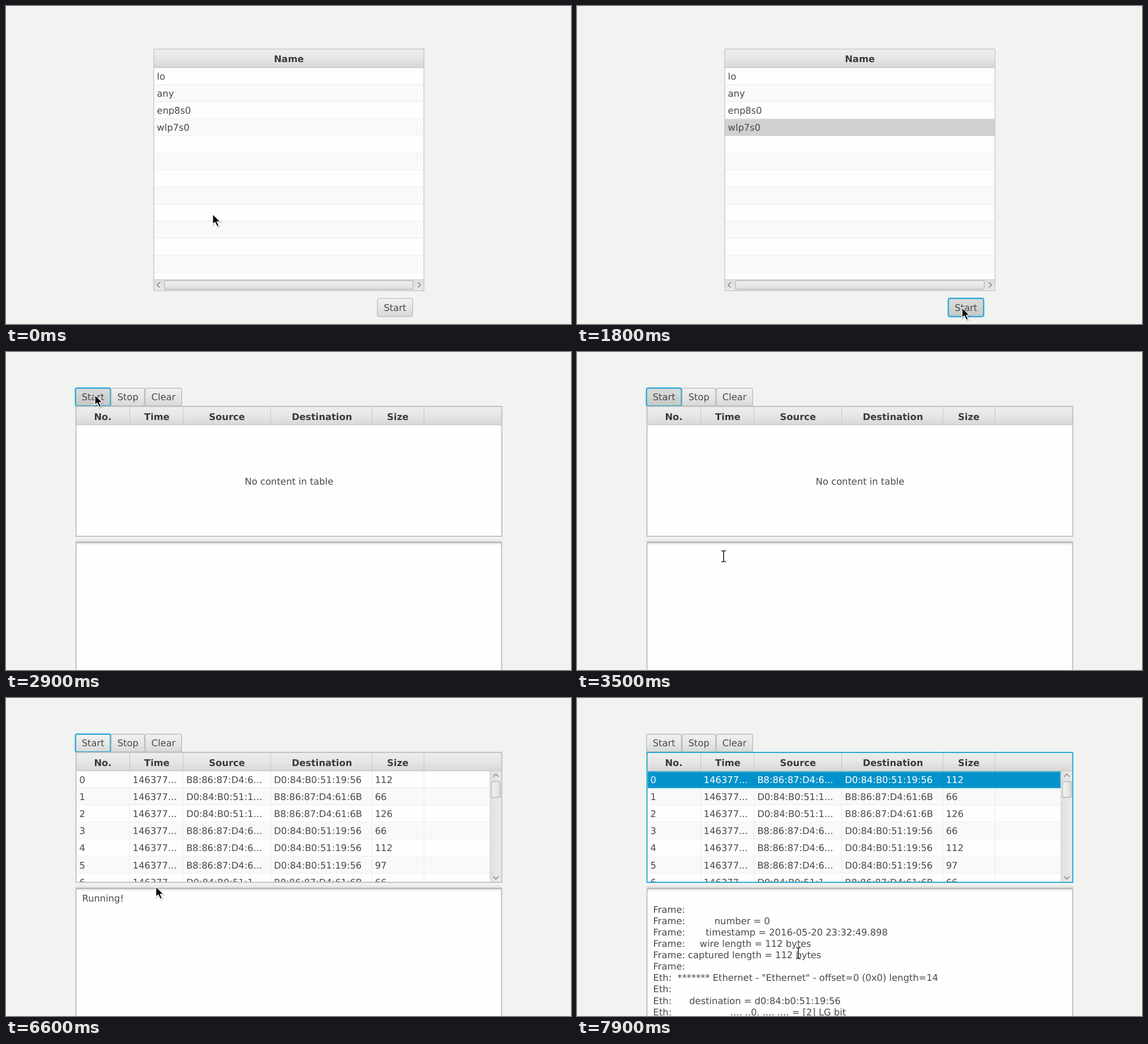
These frames come from a looping animation (998x561 px, 8 s). An HTML page:

```html
<!DOCTYPE html>
<html lang="en">
<head>
<meta charset="utf-8">
<title>Packet capture demo</title>
<style>
  html, body { margin: 0; width: 100%; height: 100%; overflow: hidden; background: #f1f3f1; }
  svg { display: block; width: 100%; height: 100%; }
  text {
    font: 16.32px "DejaVu Sans", sans-serif;
    fill: #4a494a;
    white-space: pre;
    text-rendering: geometricPrecision;
  }
  .bold { font-weight: bold; fill: #3c3a3b; }
  .mid { text-anchor: middle; }
</style>
</head>
<body>
<svg id="stage" viewBox="0 0 998 561" xmlns="http://www.w3.org/2000/svg"></svg>
<script>
const LOOP = 8000, STEP = 100, ROW = 30.13, LINE = 20.1;
const BLUE = '#0392cb', RING = '#1ea3d4', BORDER = '#bfc1bf', PAPER = '#fdfffd', RULE = '#e8eae8';
const svg = document.getElementById('stage');

function el(parent, tag, attrs = {}, content) {
  const node = document.createElementNS(svg.namespaceURI, tag);
  for (const key in attrs) node.setAttribute(key, attrs[key]);
  if (content !== undefined) node.textContent = content;
  return parent.appendChild(node);
}
const group = (parent, attrs) => el(parent, 'g', attrs);
const rect = (parent, x, y, x2, y2, fill, more) =>
  el(parent, 'rect', { x, y, width: x2 - x, height: y2 - y, fill, ...more });
const frame = (parent, x, y, x2, y2, stroke, width, more) =>
  rect(parent, x, y, x2, y2, 'none', { stroke, 'stroke-width': width, ...more });
const path = (parent, d, stroke, width, more) =>
  el(parent, 'path', { d, fill: 'none', stroke, 'stroke-width': width, ...more });
const text = (parent, x, y, str, cls = '') => el(parent, 'text', { x, y, class: cls }, str);
const show = (node, on) => node.setAttribute('visibility', on ? 'inherit' : 'hidden');

const defs = el(svg, 'defs');
function gradient(id, colors, across) {
  const g = el(defs, 'linearGradient', { id, x2: across ? 1 : 0, y2: across ? 0 : 1 });
  colors.forEach((c, i) => el(g, 'stop', { offset: i / (colors.length - 1), 'stop-color': c }));
}
gradient('head', ['#edefed', '#e5e7e5', '#d6d8d6']);
gradient('button', ['#f0f2f0', '#e6e8e6', '#d7d9d7']);
gradient('pressed', ['#dbdddb', '#d1d3d1', '#c6c8c6']);
gradient('thumb', ['#f2f4f2', '#dcdedc']);
gradient('thumbAcross', ['#f4f6f4', '#dcdedc'], true);
gradient('track', ['#dcdedc', '#e8eae8']);
gradient('trackAcross', ['#dfe1df', '#eaecea'], true);
gradient('divider', ['#f6f8f6', '#dfe1df']);
gradient('shade', ['#e3e5e3', PAPER]);

function clip(id, x, y, x2, y2) {
  rect(el(defs, 'clipPath', { id }), x, y, x2, y2, '#000');
  return { 'clip-path': `url(#${id})` };
}

function button(parent, x, y, x2, y2, label) {
  const face = rect(parent, x, y, x2, y2, 'url(#button)', { rx: 3, stroke: '#b3b5b3', 'stroke-width': 1.2 });
  const ring = group(parent);
  frame(ring, x - .6, y - .6, x2 + .6, y2 + .6, '#9fd4ea', 2.6, { rx: 3.5 });
  frame(ring, x + .1, y + .1, x2 - .1, y2 - .1, RING, 1.7, { rx: 3 });
  text(parent, (x + x2) / 2, (y + y2) / 2 + 5.9, label, 'mid');
  return (focused, pressed) => {
    show(ring, focused);
    face.setAttribute('fill', `url(#${pressed ? 'pressed' : 'button'})`);
  };
}

function stripes(parent, x, x2, top, count) {
  for (let i = 0; i < count; i++) {
    const y = top + i * ROW;
    rect(parent, x, y, x2, y + ROW, i % 2 ? '#f8faf8' : PAPER);
    rect(parent, x, y + ROW - 1, x2, y + ROW, RULE);
  }
}

function focusedRow(parent, x, y, x2) {
  rect(parent, x, y, x2, y + ROW - .4, BLUE);
  frame(parent, x + 1.6, y + 1.8, x2 - 1.6, y + ROW - 2, '#2fa9d8', 1);
}

// Interface chooser
const list = group(svg);
const listBody = group(list, clip('listClip', 261, 109, 738, 482));
stripes(listBody, 261, 738, 109, 13);
const listFocusRow = group(listBody);
focusedRow(listFocusRow, 261, 109 + 3 * ROW + .6, 738);
const listGreyRow = rect(listBody, 261, 109 + 3 * ROW, 738, 109 + 4 * ROW - .4, '#d0d2d0');
const names = ['lo', 'any', 'enp8s0', 'wlp7s0']
  .map((name, i) => text(listBody, 266.6, 129.8 + i * ROW, name));

rect(list, 261, 76, 738, 109, 'url(#head)');
rect(list, 261, 108, 738, 109.2, BORDER);
text(list, 499.6, 99.4, 'Name', 'bold mid');
rect(list, 261, 482, 738, 502, 'url(#track)');
rect(list, 261, 482, 738, 483, '#cdcfcd');
rect(list, 279.7, 484.6, 719.3, 500, 'url(#thumb)', { rx: 3, stroke: '#afb1af', 'stroke-width': 1.1 });
path(list, 'M271.8 487.6 L266.8 492.2 L271.8 496.8 M727.4 487.6 L732.4 492.2 L727.4 496.8', '#858785', 1.5);
frame(list, 261, 76, 738.3, 502.3, BORDER, 1.2);
const listRing = group(list);
frame(listRing, 260.6, 75.6, 738.8, 502.8, '#a5d8ec', 2.8);
frame(listRing, 261.2, 76.2, 738.2, 502.2, RING, 1.6);
const launch = button(list, 656, 516, 718.2, 547.8, 'Start');

// Capture window
const capture = group(svg);
const start = button(capture, 122.8, 63.8, 184.5, 95, 'Start');
button(capture, 185.7, 63.8, 244.8, 95, 'Stop')(false, false);
button(capture, 246, 63.8, 310.3, 95, 'Clear')(false, false);

const edges = [218.5, 312.7, 467.5, 646.3, 738.3];
rect(capture, 124, 96, 875.5, 325, PAPER);
const empty = text(capture, 500, 234, 'No content in table', 'mid');

const packets = group(capture);
const cells = group(packets, clip('cellClip', 124.5, 129, 875, 324.4));
stripes(cells, 124.5, 855, 129, 7);
edges.forEach(x => rect(cells, x - .5, 129, x + .5, 325, RULE));
const pickedRow = group(cells);
focusedRow(pickedRow, 124.5, 129.4, 854.5);
edges.forEach(x => rect(pickedRow, x - .5, 130, x + .5, 158, '#0c88bb'));

const outgoing = ['B8:86:87:D4:6...', 'D0:84:B0:51:19:56'];
const incoming = ['D0:84:B0:51:1...', 'B8:86:87:D4:61:6B'];
const columns = [129.6, 223.8, 318.4, 473.2, 651.7];
const firstRow = group(cells), otherRows = group(cells);
[112, 66, 126, 66, 112, 97, 66].forEach((size, i) => {
  const ends = [1, 2, 6].includes(i) ? incoming : outgoing;
  [i, '146377...', ...ends, size].forEach((value, c) =>
    text(i ? otherRows : firstRow, columns[c], 149.9 + i * ROW, value));
});
rect(packets, 855, 129, 875, 325, 'url(#trackAcross)');
rect(packets, 854.4, 129, 855.4, 325, '#d0d2d0');
rect(packets, 857.7, 147.4, 873, 175.4, 'url(#thumbAcross)', { rx: 3, stroke: '#afb1af', 'stroke-width': 1.1 });
path(packets, 'M860.4 139 L865.3 134 L870.2 139 M860.4 314.6 L865.3 319.6 L870.2 314.6', '#858785', 1.5);

rect(capture, 124, 96, 875.5, 129, 'url(#head)');
rect(capture, 124, 128, 875.5, 129.2, '#c6c8c6');
edges.forEach(x => rect(capture, x - .5, 97, x + .5, 128, '#c4c6c4'));
const heads = { 'No.': 171, Time: 266.5, Source: 390.3, Destination: 558, Size: 692 };
for (const name in heads) text(capture, heads[name], 119.6, name, 'bold mid');

const tableFrame = frame(capture, 123.6, 96, 875.7, 325.2, BORDER, 1.9);
rect(capture, 122.8, 327, 876.4, 335.4, 'url(#divider)');
rect(capture, 123, 337, 876.2, 570, PAPER);
rect(capture, 123, 337, 876.2, 341, 'url(#shade)');
frame(capture, 123.6, 336, 875.5, 580, BORDER, 2, { rx: 2 });
rect(capture, 123.4, 334.8, 876, 336.6, '#b3b5b3');

const running = text(capture, 134.6, 358.6, 'Running!');
const details = group(capture);
[
  'Frame:',
  'Frame:          number = 0',
  'Frame:       timestamp = 2016-05-20 23:32:49.898',
  'Frame:     wire length = 112 bytes',
  'Frame: captured length = 112 bytes',
  'Frame:',
  'Eth:  ******* Ethernet - "Ethernet" - offset=0 (0x0) length=14',
  'Eth:',
  'Eth:      destination = d0:84:b0:51:19:56',
  'Eth:                    .... ..0. .... .... = [2] LG bit'
].forEach((str, i) => text(details, 134.6, 358.6 + (i + 1) * LINE, str));

// Pointers
const arrow = group(svg);
const arrowShape = 'M0 0 V18.3 L4.2 14.6 L7.7 22 L11 20.5 L7.7 13.4 L13.4 13.2 Z';
path(arrow, arrowShape, '#000', 2.2, { opacity: .18, transform: 'translate(1 1.2)' });
path(arrow, arrowShape, '#fff', 1.3, { fill: '#0c0c0c', 'stroke-linejoin': 'round' });
const beam = group(svg);
const beamShape = 'M-4 -9.6 H-1.4 L0 -8.4 L1.4 -9.6 H4 M-4 9.6 H-1.4 L0 8.4 L1.4 9.6 H4 M0 -8.4 V8.4';
path(beam, beamShape, '#fff', 3.6, { opacity: .85 });
path(beam, beamShape, '#222', 1.6);

// Pointer route: time, x, y
const route = [
  [300, 365, 367], [500, 687, 514], [700, 268, 89], [800, 268, 89], [1000, 306, 222],
  [1100, 306, 222], [1700, 680, 532], [1800, 680, 532], [2500, 157, 75.5], [2900, 157, 75.5],
  [3500, 259, 360.4], [6400, 259, 360.4], [7300, 304.5, 140.5], [7400, 304.5, 140.5], [7900, 391, 450]
];
function pointerAt(t) {
  const next = route.findIndex(key => key[0] > t);
  if (next === 0) return route[0].slice(1);
  if (next < 0) return route[route.length - 1].slice(1);
  const [t0, x0, y0] = route[next - 1], [t1, x1, y1] = route[next];
  const k = (t - t0) / (t1 - t0), e = k * k * (3 - 2 * k);
  return [x0 + (x1 - x0) * e, y0 + (y1 - y0) * e];
}

function draw(time) {
  const t = Math.floor((time % LOOP) / STEP) * STEP;
  const capturing = t >= 1900, picked = t >= 7400;
  const listFocus = t >= 1100 && t < 1700, listBlur = t >= 1700;

  show(list, !capturing);
  show(listFocusRow, listFocus);
  show(listGreyRow, listBlur);
  show(listRing, listFocus);
  names[3].style.fill = listFocus ? '#fff' : '';
  launch(listBlur, listBlur);

  show(capture, capturing);
  start(!picked, t >= 2900 && t < 6100);
  show(empty, t < 6500);
  show(packets, t >= 6500);
  show(pickedRow, picked);
  for (const cell of firstRow.children) cell.style.fill = picked ? '#fff' : '';
  tableFrame.setAttribute('stroke', picked ? RING : BORDER);
  show(running, t >= 6100 && !picked);
  show(details, picked);

  const [x, y] = pointerAt(t);
  const typing = capturing && y > 338 && x > 124 && x < 875;
  show(arrow, !typing);
  show(beam, typing);
  (typing ? beam : arrow).setAttribute('transform', `translate(${x} ${y})`);
}

const begin = performance.now();
function tick() {
  draw(performance.now() - begin);
  requestAnimationFrame(tick);
}
tick();
</script>
</body>
</html>
```
